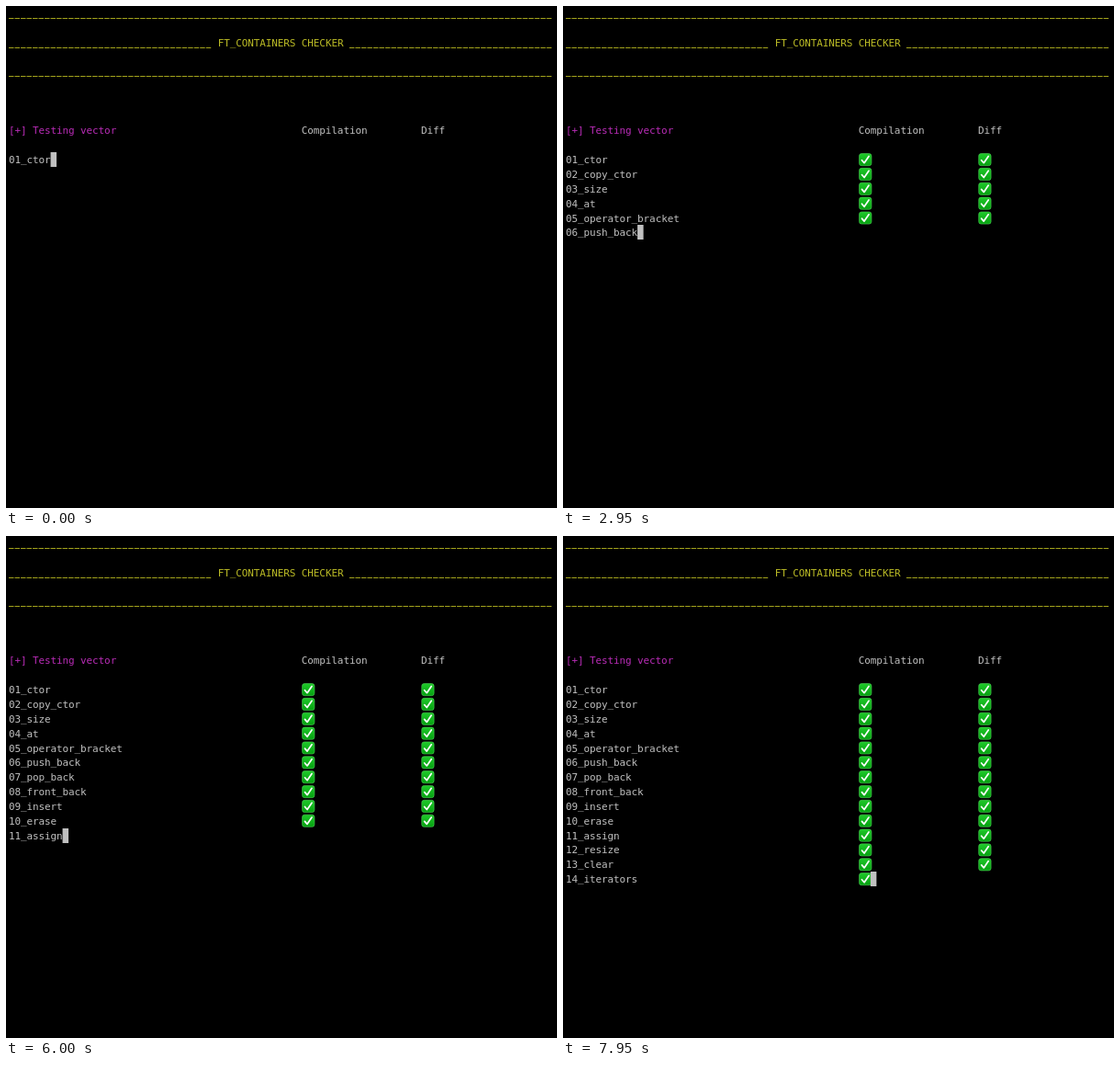
Animation of 600x546 px, one loop 8000 ms. Source, as an HTML page:

```html
<!DOCTYPE html>
<html lang="en">
<head>
<meta charset="utf-8">
<title>Container checker</title>
<style>
  html, body { margin: 0; width: 100%; height: 100%; overflow: hidden; background: #000; }
  svg { display: block; width: 600px; height: 546px; }
  text { font: 11px "DejaVu Sans Mono", monospace; letter-spacing: -.115px; fill: #c0c0c0; white-space: pre; }
  .rule { stroke: #a3a31c; stroke-width: 1; stroke-dasharray: 5.5 1.007; }
  text.yellow { fill: #bcbc26; }
  text.magenta { fill: #b92cb7; }
</style>
</head>
<body>
<svg id="screen" viewBox="0 0 600 546">
  <defs>
    <linearGradient id="green" x2="0" y2="1">
      <stop offset="0" stop-color="#1fc92a"/>
      <stop offset="1" stop-color="#05a010"/>
    </linearGradient>
    <g id="tick">
      <rect x=".4" y=".4" width="13.4" height="13.2" rx="2.6" fill="url(#green)" stroke="#4fce58" stroke-width=".6"/>
      <path d="M3.3 7.6 5.9 10.6 10.9 3.3" fill="none" stroke="#fff" stroke-width="1.7" stroke-linecap="round" stroke-linejoin="round"/>
    </g>
  </defs>
</svg>
<script>
const LOOP = 8000, CELL = 6.507, LINE = 15.85;
const FIRST_ROW = 10, COMPILE_COL = 49, DIFF_COL = 69;
const START = 65, STEP = 575, COMPILE_TIME = 350;
const tests = ['ctor', 'copy_ctor', 'size', 'at', 'operator_bracket', 'push_back', 'pop_back',
  'front_back', 'insert', 'erase', 'assign', 'resize', 'clear', 'iterators'];

const screen = document.getElementById('screen');
const colX = col => 3 + col * CELL;
const baseline = row => 12.6 + row * LINE;

function add(tag, attrs, content = '', parent = screen) {
  const node = document.createElementNS('http://www.w3.org/2000/svg', tag);
  for (const key in attrs) node.setAttribute(key, attrs[key]);
  node.textContent = content;
  return parent.appendChild(node);
}

// Underscores sit close below the baseline, so they are lifted a little.
function write(row, col, content, color = '') {
  const line = add('text', { x: colX(col), y: baseline(row), class: color });
  let lift = 0;
  for (const part of content.split(/(_)/)) {
    const wanted = part === '_' ? -1 : 0;
    add('tspan', { dy: wanted - lift }, part, line);
    lift = wanted;
  }
  return line;
}

function rule(row, from, to) {
  const y = Math.round(baseline(row) + .4) + .5;
  add('line', { x1: colX(from), x2: colX(to), y1: y, y2: y, class: 'rule' });
}
const tick = (row, col) =>
  add('use', { href: '#tick', x: colX(col) + .3, y: baseline(row) - 11 });
const show = (node, visible) => node.setAttribute('visibility', visible ? 'visible' : 'hidden');

rule(0, 0, 91);
rule(2, 0, 34);
write(2, 35, 'FT_CONTAINERS CHECKER', 'yellow');
rule(2, 57, 91);
rule(4, 0, 91);
write(8, 0, '[+] Testing vector', 'magenta');
write(8, COMPILE_COL, 'Compilation');
write(8, DIFF_COL, 'Diff');

const rows = tests.map((test, i) => {
  const row = FIRST_ROW + i;
  const label = String(i + 1).padStart(2, '0') + '_' + test;
  return {
    length: label.length,
    name: write(row, 0, label),
    compiled: tick(row, COMPILE_COL),
    passed: tick(row, DIFF_COL)
  };
});
const cursor = add('rect', { width: CELL, height: 16, fill: '#c0c0c0' });

function render(time) {
  const active = Math.max(0, Math.floor((time - START) / STEP));
  const compiled = time - START - active * STEP >= COMPILE_TIME;
  rows.forEach((row, i) => {
    show(row.name, i <= active);
    show(row.compiled, i < active || (i === active && compiled));
    show(row.passed, i < active);
  });
  cursor.setAttribute('x', colX(compiled ? COMPILE_COL + 2 : rows[active].length));
  cursor.setAttribute('y', Math.round(baseline(FIRST_ROW + active) - 12.1));
}

const origin = performance.now();
function frame(now) {
  render(Math.max(0, now - origin) % LOOP);
  requestAnimationFrame(frame);
}
render(0);
requestAnimationFrame(frame);
</script>
</body>
</html>
```
